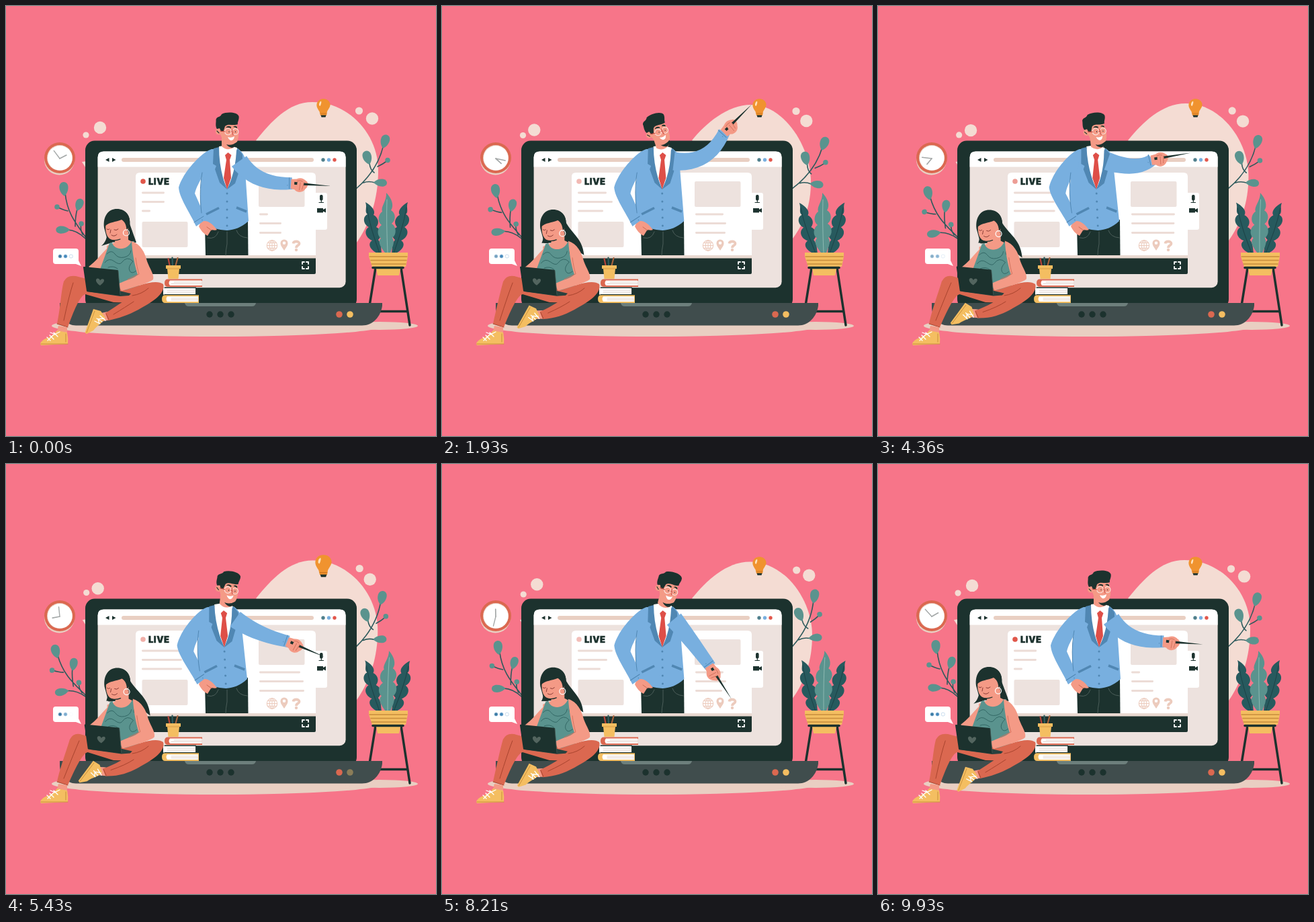
An HTML page for the animation above (10 s loop, 640x640 px).

```html
<!DOCTYPE html>
<html lang="en">
<head>
<meta charset="utf-8">
<title>Live lesson</title>
<style>
html, body { margin: 0; width: 100%; height: 100%; overflow: hidden; background: #f77589; }
svg { display: block; width: 100vw; height: 100vh; }
.dark { fill: #1c322e } .skin { fill: #f49a86 } .blue { fill: #78afdf } .navy { fill: #5087b3 }
.rust { fill: #db6850 } .yel { fill: #f4be61 } .teal { fill: #5a938e } .pale { fill: #f4dcd3 }
.sand { fill: #e9cfc2 } .mist { fill: #ede2de } .white { fill: #fff }
.ln { fill: none; stroke-linecap: round; stroke-linejoin: round }
.stem { fill: none; stroke: #2d5a5c; stroke-width: 1.6; stroke-linecap: round }
</style>
</head>
<body>
<svg viewBox="0 0 640 640">
<defs>
  <path id="leaf" class="teal" d="M0 0C-5-4-7.500-10-6.500-15.500C-5-22.500 4-23 6-16.500C7.500-11 5-4 0 0Z"/>
  <g id="sideLeaf">
    <path fill="#275a5e" d="M553 368C543 364 537 354 545 349C535 345 532 334 540 329C532 325 530 314 538 310C533 306 538 300 535 292C544 297 551 305 547 311C553 314 557 322 551 329C558 332 561 342 554 348C559 354 558 362 559 368Z"/>
    <path class="ln" stroke="#1d4347" d="M537 300C541 325 548 345 556 368"/>
  </g>
</defs>
<rect width="640" height="640" fill="#f77589"/>

<path id="blob" class="pale"/>
<path id="blobTip" class="pale" d="M113 232L120 231V243Z"/>
<g id="big" class="pale"><circle cx="140" cy="181" r="9.200"/><circle cx="545" cy="167.500" r="9.200"/></g>
<g id="small" class="pale"><circle cx="119" cy="192" r="4.600"/><circle cx="525.500" cy="156" r="5.600"/></g>

<g id="branchL">
  <path class="stem" d="M120 346C106 326 91 310 88 278M92 305Q86 304 76 299M103 328Q103 314 106 302M114 340Q110 332 112 324M118 346Q106 334 92 333"/>
  <use href="#leaf" transform="translate(87 283) rotate(-4)"/>
  <use href="#leaf" transform="translate(106 305) rotate(18) scale(.9)"/>
  <use href="#leaf" transform="translate(95 333) rotate(-90) scale(.85 .98)"/>
  <circle class="teal" cx="76" cy="299" r="3.800"/><circle class="teal" cx="112" cy="324" r="3.800"/>
</g>
<g id="branchR">
  <path class="stem" d="M520 273C540 256 556 234 562 206M548 248Q542 244 541 234M553 239Q560 236 568 230M532 263Q540 260 549 263"/>
  <use href="#leaf" transform="translate(561 212) rotate(16)"/>
  <use href="#leaf" transform="translate(541 236) rotate(-16)"/>
  <use href="#leaf" transform="translate(547 262.500) rotate(93) scale(.85 .95)"/>
  <circle class="teal" cx="568" cy="229.500" r="3.800"/>
</g>

<ellipse class="sand" cx="315" cy="476" rx="247" ry="16"/>
<ellipse class="sand" cx="556" cy="476" rx="57" ry="6"/>

<path class="ln" stroke="#1c322e" stroke-width="3.500" d="M550 390L541 446M588 390L601 475M556 454.500H597"/>
<g id="leafL"><use href="#sideLeaf"/></g>
<g id="leafR"><use href="#sideLeaf" transform="translate(1133 0) scale(-1 1)"/></g>
<g id="leafC">
  <path class="teal" d="M565 368C559 361 552 351 558 346C551 340 553 330 559 326C552 321 554 310 560 306C557 299 567 290 566 278C574 286 578 297 573 304C580 308 581 318 574 324C581 328 582 340 575 345C580 352 574 360 572 368Z"/>
  <path class="ln" stroke="#8db9b2" d="M567 288C566 320 567 345 568 367"/>
</g>
<path class="yel" d="M551 391H587L585 401H553ZM540 367H598V373L595 388H545L540 373Z"/>
<path class="ln" stroke="#c88d3c" stroke-width="1.300" d="M541 373H597M543 378.500H596M544 384H595"/>
<path class="ln" stroke="#1c322e" stroke-width="3.500" d="M546 389.500H591"/>

<rect class="dark" x="118" y="200.600" width="404" height="250" rx="14"/>
<rect class="mist" x="136.600" y="216.600" width="369" height="202.600" rx="9"/>
<path class="white" d="M136.600 239.500V225Q136.600 216.600 145 216.600H497Q505.600 216.600 505.600 225V239.500Z"/>
<path class="dark" d="M153.500 226V232L148 229ZM158 226V232L163.500 229Z"/>
<rect class="sand" x="172" y="226" width="286" height="6" rx="3"/>
<circle cx="472" cy="229" r="2.700" fill="#4f7f8c"/><circle class="blue" cx="480.500" cy="229" r="2.700"/><circle cx="489" cy="229" r="2.700" fill="#e2564b"/>

<path class="white" d="M193 371V254Q193 248 199 248H455Q461 248 461 254V278H475Q478 278 478 281V330Q478 333 475 333H461V371Z"/>
<rect x="193" y="371" width="268" height="5" fill="#e9d9d1"/>
<path class="dark" d="M193 375.500H461V397Q461 399 459 399H193Z"/>
<path class="ln" stroke="#fff" stroke-width="1.800" d="M441 384V381H444M447 381H450V384M450 388V391H447M444 391H441V388"/>
<circle id="live" cx="204" cy="261" r="3.800" fill="#e0574a"/>
<text x="212" y="265.900" font-family="Inter, Lato, sans-serif" font-weight="900" font-size="13" letter-spacing=".5" class="dark" stroke="#1c322e" stroke-width=".4">LIVE</text>
<rect class="mist" x="202.500" y="321" width="68" height="38" rx="2"/>
<rect class="mist" x="376" y="261" width="68.500" height="38" rx="2"/>
<path id="lines" class="ln" stroke="#ecdcd6" stroke-width="2.800"/>
<g class="ln" stroke="#eccbbd" stroke-width="1.100">
  <circle cx="396" cy="356.500" r="7.700"/><ellipse cx="396" cy="356.500" rx="3.600" ry="7.700"/>
  <path d="M396 349V364M388.500 356.500H403.500M390 352.500H402M390 360.500H402"/>
</g>
<path fill="#eccbbd" fill-rule="evenodd" d="M414 364C409 357 408.500 355 408.500 353A5.500 5.500 0 0 1 419.500 353C419.500 355 419 357 414 364ZM414 350.500A2.300 2.300 0 1 0 414 355.100A2.300 2.300 0 1 0 414 350.500Z"/>
<path class="ln" stroke="#eccbbd" stroke-width="3.800" style="stroke-linecap:butt" d="M427.500 353.500C428 349.500 436.500 349.500 436.500 353.500C436.500 357 432 356 432 360"/>
<circle cx="432" cy="363" r="2.200" fill="#eccbbd"/>
<rect class="dark" x="467" y="281" width="4.600" height="8.500" rx="2"/>
<path class="ln" stroke="#1c322e" stroke-width="1.200" d="M469.300 289V292M466 292.500H472.500"/>
<path class="dark" d="M463 301H472V303L476 301V307.500L472 305.500V307.500H463Z"/>

<path fill="#404d4d" d="M80 442H560V446C558 462 546 475.500 530 475.500H104C90 475.500 80 462 80 448Z"/>
<path fill="#6d7f7c" d="M266 442H372Q371 447 366 447H272Q267 447 266 442Z"/>
<g class="dark"><circle cx="303" cy="459" r="4.700"/><circle cx="319" cy="459" r="4.700"/><circle cx="335" cy="459" r="4.700"/></g>
<circle class="rust" cx="496" cy="459" r="4.800"/><circle id="lamp" cx="512" cy="459" r="4.800"/>

<!-- teacher -->
<path class="dark" d="M296 326L360 318L360.500 371H297Z"/>
<path class="ln" stroke="#52645f" stroke-width=".9" d="M329 336V354Q327 364 327 371M300 345Q312 348 316 336M343 334Q346 344 359 345"/>
<g id="man">
  <path class="blue" d="M306 213L345 212C356 220 359 232 356 245L361 320C350 330 340 333 329 334C316 333 304 330 295 325L290 310C288 290 289 270 292 250L296 225Z"/>
</g>
<path class="skin" d="M290 321C300 317 308 325 314 333C310 335 307 332 305 334L300 342C294 339 290 334 287 328Z"/>
<path class="ln" stroke="#c4664f" stroke-width=".9" d="M299 329L306 334"/>
<g id="restArm">
  <path class="blue" d="M306 213C290 218 262 250 257 270C258 286 273 306 283 328L297 318C293 306 287 292 281 279C283 270 288 262 291 256L303 240Z"/>
  <path class="ln" stroke="#5087b3" stroke-width="1" d="M280 322L294 313M292 318V319"/>
</g>
<g id="front">
  <path class="ln" stroke="#5087b3" stroke-width="1" d="M292 248C288 270 289 292 291 308"/>
  <path class="white" d="M317 209L330 207L344 211L340 250L329 272L316 240Z"/>
  <path fill="#de4f48" d="M326 222L330.500 218L335.500 222L333 229L335 256L329 273L324 256L328 229Z"/>
  <path class="navy" d="M309 212L317 210C317 232 321 254 329 273L318 263L311 243L313 238L308 235ZM345 212L352 221L352 238L346 241L347 246L341 264L329 273C338 254 342 236 343 215Z"/>
  <path class="ln" stroke="#5087b3" stroke-width="3.600" style="stroke-linecap:butt" d="M298 310L317 300.500M343 300L358 306"/>
  <path class="ln" stroke="#5087b3" stroke-width="3" stroke-dasharray="0 12" d="M329 279V328"/>
</g>
<path id="sleeve" class="blue"/>
<g id="hand">
  <path class="skin" d="M-2-6L6-7C12-10 17-8 20-5C25-3 24 4 20 7C17 13 8 14 4 9L-2 8Z"/>
  <path class="dark" d="M3-2.500L14-2L58 0L14 1.800L3 1.500Z"/>
  <path class="skin" d="M8-3C12-6 17-4 17 0L15 10L10 11C8 7 6 1 8-3Z"/>
  <path class="ln" stroke="#d1705b" stroke-width=".9" d="M12-2L11 9M17-1L15 8M7-4Q11-6 15-4"/>
  <path class="ln" stroke="#5087b3" stroke-width="1" d="M-5-8L-4 8M-7 3V3.500"/>
</g>
<g id="headWrap"><g id="head">
  <path class="skin" d="M321 194V209Q330 217 340 210V198Z"/>
  <path class="skin" d="M318 176H343C347 184 347 195 344 202C339 208 328 207 323 201L319 191Z"/>
  <circle class="skin" cx="316.500" cy="187" r="4.600"/>
  <path class="dark" d="M314 183C311 178 313 173 312.500 169C314 164 319 166 321 161C329 157 344 158 346.500 164C347.500 169 344 173 345 176C338 179 331 174 326 179L323.500 187L320 187L318 182Z"/>
  <path class="dark" d="M328 206C333 208 339 206 343 203C343 207 340 211 336 211Q331 210 328 206ZM327 181Q330 177 335 180L335 182Q330 180 327 181ZM338 180Q341 177 344 180V182Q341 180 338 180Z"/>
  <path class="white" d="M330 195Q335 197 340 194Q339 201 334 200Q331 198 330 195Z"/>
  <path class="ln" stroke="#1c322e" stroke-width="1.100" d="M314 186L317 189M332 187V187.500M341.500 187V187.500"/>
  <g class="ln" stroke="#fbe6df" stroke-width="1.100"><circle cx="330.500" cy="187" r="4.800"/><circle cx="341.500" cy="187" r="4.400"/></g>
  <path class="ln" stroke="#c9493f" stroke-width="1.100" d="M319 186L326 187M335.500 187H337M336.500 184L338 192"/>
</g></g>

<!-- desk things -->
<path class="ln" stroke-width="2.200" stroke="#b5443a" d="M241.500 376L244 388"/>
<path class="ln" stroke-width="2.200" stroke="#2d5a5c" d="M247.500 374.500L248 388"/>
<path class="ln" stroke-width="2.200" stroke="#a8623c" d="M255.500 375L252 388"/>
<path class="yel" d="M238 386H260V391H258L256.500 406H241.500L240 391H238Z"/><path class="ln" stroke="#d79a45" d="M240 391H258"/>
<path class="rust" d="M292 406.500H241Q236 406.500 236 412.200Q236 418 241 418H292V416H245V409H292Z"/>
<path class="white" d="M291 408.500H244Q241 412 244 416H291Z"/>
<path class="white" d="M282 419.500H234V429.500H282Z"/>
<path class="dark" d="M283 418.500H236V420H283ZM283 429H236V430.300H283Z"/>
<path class="yel" d="M287 430.300H237Q232 430.300 232 436Q232 442 237 442H287Z"/>
<path class="white" d="M286 432.300H240Q237 436 240 440H286Z"/>
<path class="ln" stroke="#d8c4bc" stroke-width=".8" d="M250 411H291M246 413.500H291M240 423H282M240 426H282M246 435H286M246 437.500H286"/>

<!-- clock -->
<circle class="sand" cx="79.500" cy="229" r="22.500"/><circle class="rust" cx="80" cy="226" r="23"/>
<circle class="sand" cx="80" cy="226" r="19"/><circle class="white" cx="80.300" cy="226.300" r="18.300"/>
<path id="hour" class="ln" stroke="#a4a8a8" stroke-width="1.700" d="M80 227V216"/>
<path id="minute" class="ln" stroke="#a4a8a8" stroke-width="1.400" d="M80 227V212.500"/>

<!-- chat -->
<path class="white" d="M74 361H104Q108 361 108 365V379L112 387L104 384H74Q70 384 70 380V365Q70 361 74 361Z"/>
<g stroke="#a9c9e4" stroke-width=".7">
  <circle class="dot" cx="80.500" cy="372.500" r="2.600" fill="#3b7ba4"/><circle class="dot" cx="88.500" cy="372.500" r="2.600" fill="#4589bb"/><circle class="dot" cx="96.800" cy="372.500" r="2.600" fill="#fff"/>
</g>

<!-- bulb -->
<g id="bulb">
  <path fill="#f0932f" d="M466.500 157C463 152 462 149 462.500 146C464 135.500 481 135.500 482.500 146C483 150 480 153 478 157L477 163H468Z"/>
  <path class="dark" d="M468.500 162.500H476.500L475.500 165.500H469.500Z"/>
  <path class="ln" stroke="#c9731d" stroke-width=".9" d="M468 160H477"/>
  <path fill="#ffe3bd" d="M466 148Q465.500 143 469 141.500Q470 144 467.500 149Z"/>
</g>
<path id="rays" class="ln" stroke="#ef8f35" stroke-width="1.200" d="M473 126V130M464 128L466 131M482 128L480 131M458 135L461 137M488 135L485 137"/>

<!-- student -->
<g id="upper">
  <path id="strand" class="dark"/>
  <path class="dark" d="M146 330C144 312 153 302 165 302C178 302 186 312 184 326C184 336 186 342 188 350L152 352Z"/>
  <path class="skin" d="M151 360C142 369 134 380 123 388L133 396C144 390 152 384 154 374ZM163 338L162 352L150 357V375H200L194 354L182 348V335Z"/>
  <path class="teal" d="M148 370L154 353L158 352C160 363 180 366 187 350L191 350C191 364 197 368 198 377V425L165 425L140 392Z"/>
  <path class="ln" stroke="#2f6461" stroke-width=".9" d="M150 369Q157 362 162 369T176 374T186 364M147 382Q153 374 161 380T172 382Q180 371 189 380Q181 388 184 394T194 394M152 389Q160 386 166 391M191 362Q186 368 195 372"/>
  <path class="skin" d="M148.500 324C147 338 151 347 159 348.500C171 350 180 342 182 330L179 317C170 315 157 315 148.500 324Z"/>
  <path class="dark" d="M147 328C146 313 154 303 166 303C180 303 186 314 184 328L179.500 333C179 326 177 321 172 318C163 322 154 321 147 328Z"/>
  <path class="ln" stroke="#8a3c36" stroke-width="1" d="M150 332Q152 334 154 332M161 333Q164 335 167 332M157 341Q161 344 165 340M156 333L155 338"/>
  <path class="ln" stroke="#1c322e" stroke-width="1.200" d="M155 348Q163 350 170 347"/>
  <circle class="ln" cx="179" cy="337.500" r="4.500" stroke="#fff" stroke-width="1.200"/>
</g>
<path id="farLeg" class="rust"/>
<g id="shoe">
  <path class="skin" d="M151 455L155 467L141 470L137 458Z"/>
  <path class="yel" d="M130 451L141 454L148 464C144 472 136 475 130 483L120 488L117.500 486Z"/>
  <path class="ln" stroke="#c98f3d" stroke-width=".9" d="M132 454L120 486"/>
  <path class="ln" stroke="#fff" stroke-width="1.300" d="M132 469L140 473M135 465L143 470M140 461L148 468M139 473L137 466L146 465"/>
</g>
<path id="nearLeg" class="rust"/>
<path id="folds" class="ln" stroke="#a9442f" stroke-width="1"/>
<path class="skin" d="M78 476L91 478L91 490L75 488Z"/>
<path class="yel" d="M76 483L91 486Q93 495 92 503L52 505Q49 501 57 496Q70 491 76 483Z"/>
<path class="ln" stroke="#c98f3d" d="M52 503H92M89 488V500"/>
<path class="ln" stroke="#fff" stroke-width="1.300" d="M61 493L66 498M65 490L71 496M71 486L77 492M62 498L70 490L80 485M66 486L74 489"/>
<g id="device">
  <path class="skin" d="M187 350C200 354 207 367 210 380C214 391 221 400 219 407C213 412 196 417 172 424L166 414C180 407 190 406 196 400C191 385 188 366 187 350Z"/>
  <path class="ln" stroke="#d1705b" stroke-width=".9" d="M193 375Q195 390 198 399L181 407"/>
  <path fill="#2a413e" d="M120 425L169 424L186 428L183 431L170 432Z"/>
  <path class="dark" stroke="#1c322e" stroke-width="2" stroke-linejoin="round" d="M116 389L166 394L169 430L121 424Z"/>
  <path class="ln" stroke="#435954" stroke-width=".8" d="M167 394L170 430"/>
  <path fill="#53655f" d="M140 416C132 411 133 405 137 405.500Q139.500 406 140 408.500Q142 405.500 145 406.500C148 409 144 413 140 416Z"/>
</g>
</svg>
<script>
const LOOP = 10000, STOPS = [0, 1930, 3290, 5430, 6500, 8210];
const $ = id => document.getElementById(id);
const set = (id, name, value) => $(id).setAttribute(name, value);
const mix = (a, b, k) => a + (b - a) * k;
const ease = k => k * k * (3 - 2 * k);

// Smooth closed curve through one value per stop.
function flow(t, v) {
  const n = v.length;
  const time = i => STOPS[(i + n) % n] + LOOP * Math.floor(i / n);
  const val = i => v[(i + n) % n];
  const slope = i => (val(i + 1) - val(i - 1)) / (time(i + 1) - time(i - 1));
  let i = n - 1;
  while (time(i) > t) i--;
  const span = time(i + 1) - time(i), k = (t - time(i)) / span, q = 1 - k;
  return val(i) * (1 + 2 * k) * q * q + val(i + 1) * (3 - 2 * k) * k * k +
    span * (slope(i) * k * q * q - slope(i + 1) * k * k * q);
}

// from, to, pointer tip x/y, pointer angle, elbow x/y, head tilt
const POSES = [
  [0, 250, 484, 268, 4, 372, 267, 0],
  [1500, 1500, 462, 146, -45, 398, 237, -17],
  [3600, 3600, 457, 147, -44, 397, 238, -20],
  [5100, 5550, 474, 287, 23, 375, 255, 9],
  [6350, 6900, 465, 301, 30, 373, 257, 13],
  [7900, 8500, 431, 350, 57, 369, 260, 15],
  [10000, 10000, 484, 268, 4, 372, 267, 0]
];
function pose(t) {
  const i = POSES.findIndex(p => t <= p[1]), p = POSES[i];
  if (t >= p[0]) return p.slice(2);
  const o = POSES[i - 1], k = ease((t - o[1]) / (p[0] - o[1]));
  return p.slice(2).map((v, j) => mix(o[j + 2], v, k));
}

// Tapered sleeve along a quadratic curve.
function sleeve(sx, sy, cx, cy, wx, wy) {
  const a = [], b = [];
  for (let i = 0; i <= 12; i++) {
    const k = i / 12, q = 1 - k, w = mix(13.5, 8.8, k);
    const x = q * q * sx + 2 * q * k * cx + k * k * wx, y = q * q * sy + 2 * q * k * cy + k * k * wy;
    const dx = q * (cx - sx) + k * (wx - cx), dy = q * (cy - sy) + k * (wy - cy), d = Math.hypot(dx, dy);
    a.push([x + dy / d * w, y - dx / d * w]);
    b.unshift([x - dy / d * w, y + dx / d * w]);
  }
  return "M" + a.concat(b).map(p => p.map(n => n.toFixed(2)).join(" ")).join("L") + "Z";
}

const BLOB_A = [372, 200, 395, 172, 420, 143, 456, 143, 510, 143, 554, 190, 554, 245, 554, 290, 540, 326, 522, 352];
const BLOB_B = [372, 200, 392, 175, 425, 147, 460, 147, 510, 147, 549, 210, 549, 262, 549, 295, 540, 322, 522, 346];
const ROWS = [
  [202, 278, [34, 43, 58, 60, 60, 52]], [202, 291.5, [34, 52, 60, 60, 60, 44]], [202, 305, [13, 38, 60, 60, 60, 34]],
  [377, 310, [13, 42, 64, 61, 52, 42]], [377, 323.5, [33, 46, 60, 66, 61, 46]], [377, 337.5, [33, 45, 59, 67, 63, 40]]
];
const DOTS = [[1, .7, .3, 1, 1, 1], [1, 1, .65, .7, 1, 1], [.9, .9, .9, .1, .5, .9]];

function drawBackdrop(t) {
  const m = flow(t, [0, 1, 1, .15, 1, .6]);
  const pts = BLOB_A.map((v, i) => mix(v, BLOB_B[i], m));
  set("blob", "d", `M${pts.slice(0, 2)}C${pts.slice(2)}Z`);
  set("blobTip", "transform", `translate(${5 * m} 0)`);
  set("big", "transform", `translate(${flow(t, [0, -2.7, -1, -3.3, -4, 1.3])} ${flow(t, [0, 3.5, 3.5, 4.3, 2, -1.7])})`);
  set("small", "transform", `translate(${flow(t, [0, 1.5, 2.5, .7, 1, 2.2])} ${flow(t, [0, .5, .5, -.5, .5, 2])})`);
  const turn = (id, v, x, y) => set(id, "transform", `rotate(${flow(t, v)} ${x} ${y})`);
  turn("branchL", [0, -5, -8, -10, -8.5, -2], 118, 345);
  turn("branchR", [0, 4, 4, -3.5, -7, -7.5], 522, 272);
  turn("leafL", [0, -2.5, -2.5, -.5, 0, 0], 556, 368);
  turn("leafC", [0, 0, 1, 2.5, 2.5, 2], 568, 368);
  turn("leafR", [0, 1, 2, 2.5, 2.5, 2], 577, 368);
  set("hour", "transform", `rotate(${63 + 360 * t / LOOP} 80 227)`);
  set("minute", "transform", `rotate(${323 + 720 * t / LOOP} 80 227)`);
}

function drawScreen(t) {
  set("lines", "d", ROWS.map(([x, y, v]) => `M${x + 1.4} ${y}h${flow(t, v) - 2.8}`).join(""));
  set("live", "opacity", .7 + .32 * Math.cos(6 * Math.PI * t / LOOP));
  const beat = t % 2000;
  set("lamp", "fill", beat > 1000 && beat < 1700 ? "#8b7d58" : "#f4be61");
  document.querySelectorAll(".dot").forEach((el, i) => el.setAttribute("opacity", flow(t, DOTS[i])));
}

function drawBulb(t) {
  const glow = t > 2200 && t < 4330 ? Math.sin(Math.PI * (t - 2200) / 2130) : 0;
  let size = 1 + .17 * glow;
  if (t > 5330 && t < 7500) size += .2 * (t < 5430 ? (t - 5330) / 100 : 1 - ease((t - 5430) / 2070));
  set("bulb", "transform", `translate(472.5 152) scale(${size}) translate(-472.5 -152)`);
  set("rays", "opacity", Math.min(1, glow * 2) * .8);
}

function drawMan(t) {
  const s = (1 - Math.cos(2 * Math.PI * t / LOOP)) / 2;
  const [tx, ty, ang, cx, cy, tilt] = pose(t);
  const lean = (k, y) => `matrix(1 0 ${k * s} 1 ${-y * k * s} 0)`;
  const r = ang * Math.PI / 180, wx = tx - 58 * Math.cos(r), wy = ty - 58 * Math.sin(r);
  set("man", "transform", lean(.04, 371));
  set("front", "transform", lean(.043, 371));
  set("restArm", "transform", lean(.07, 305));
  set("headWrap", "transform", lean(.024, 371));
  set("head", "transform", `rotate(${tilt} 330 212)`);
  set("sleeve", "d", sleeve(347 - 6 * s, 231, cx, cy, wx, wy));
  set("hand", "transform", `translate(${wx} ${wy}) rotate(${ang})`);
}

function drawWoman(t) {
  const s = Math.sin(Math.PI * t / LOOP), h = Math.min(1, 1.5 * s);
  set("upper", "transform", `translate(${.6 * s} ${1.6 * s})`);
  set("device", "transform", `translate(${1.8 * s} ${-.4 * s})`);
  set("strand", "d", `M180 312C188 336 ${190 + 22 * h} ${340 + 2 * h} ${194 + 20 * h} ${352 + 21 * h}C${190 + 10 * h} ${352 + 10 * h} 184 356 174 344Z` +
    `M148 325C154 342 148 352 ${142 + 7 * h} ${357 - 6 * h}L158 352L160 330Z`);
  const kx = 9 * s;
  set("farLeg", "d", `M76 473C81 450 ${82 + kx} 424 ${86 + kx} 410Q${91 + kx} 400 ${104 + kx * .7} 402L165 418L200 432L196 442L160 441L${118 + kx * .4} 429Q${109 + kx * .4} 430 92 478Z`);
  set("shoe", "transform", `translate(${-4 * s} ${-4 * s}) rotate(${17 * s} 150 461)`);
  const ax = 152 - 4 * s, ay = 468 - 3.5 * s;
  set("nearLeg", "d", `M234 414C238 429 215 442 197 452C182 460 168 465 ${ax} ${ay}L${ax - 4} ${ay - 11}C166 446 176 438 188 431L162 428L198 416Q225 407 234 414Z`);
  set("folds", "d", `M76 473L92 478M${ax - 3} ${ay - 10}L${ax + 1} ${ay - 1}M188 431Q202 429 212 420M${100 + kx} 412Q${94 + kx * .8} 430 86 468M${ax + 8} ${ay - 9}Q178 448 190 440`);
}

const start = performance.now();
(function tick() {
  const t = (performance.now() - start) % LOOP;
  for (const draw of [drawBackdrop, drawScreen, drawBulb, drawMan, drawWoman]) draw(t);
  requestAnimationFrame(tick);
})();
</script>
</body>
</html>
```
